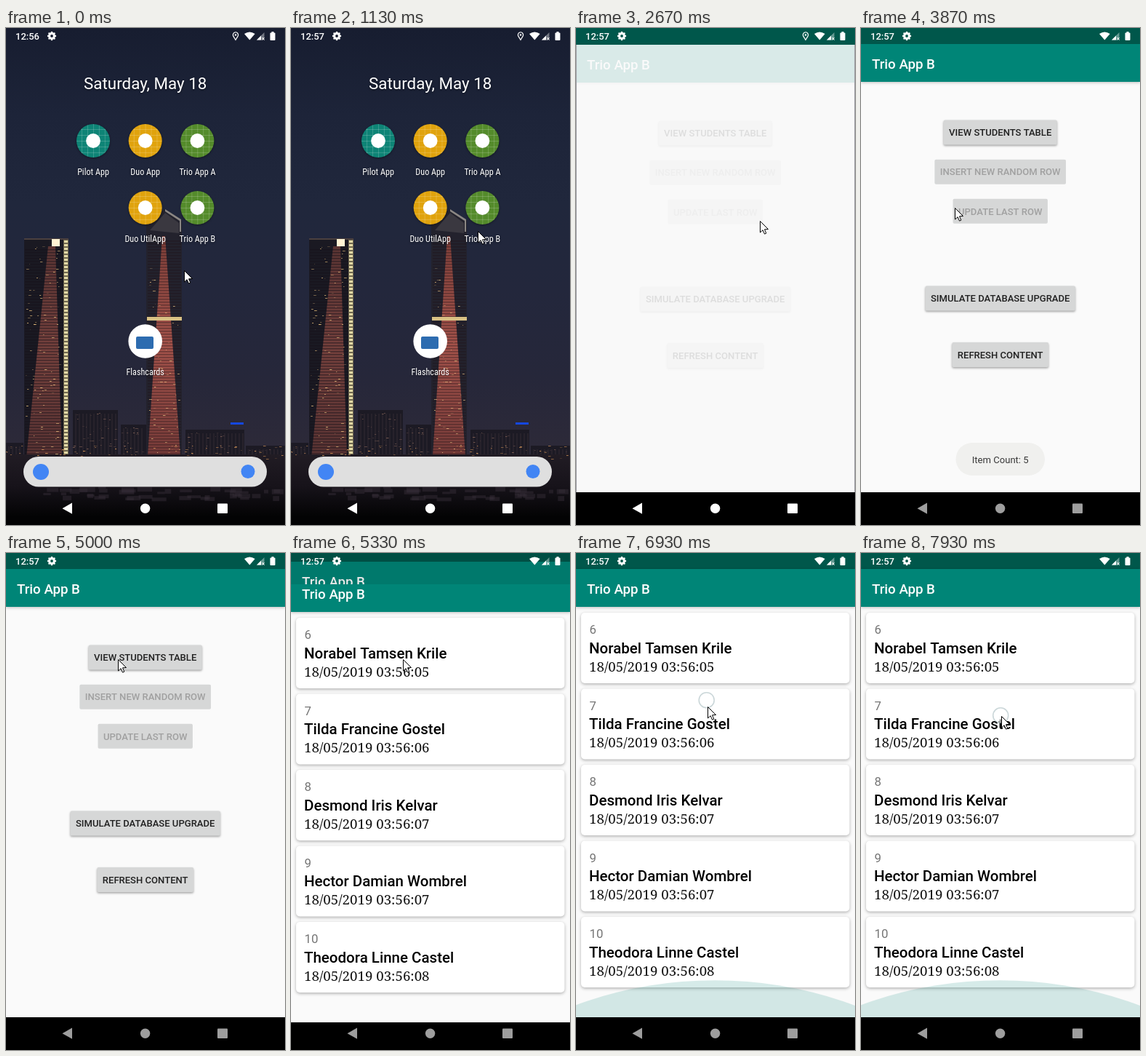
Animation of 384 by 683 pixels, one loop 8000 ms. Source, as an HTML page with a canvas:

```html
<!DOCTYPE html>
<html lang="en">
<head>
<meta charset="utf-8">
<title>Phone demo</title>
<style>
html, body { margin: 0; width: 100%; height: 100%; overflow: hidden; background: #000; }
canvas { display: block; width: 384px; height: 683px; }
</style>
</head>
<body>
<canvas id="stage" width="384" height="683"></canvas>
<script>
const W = 384, H = 683, NAV_TOP = 638, CENTER = 191.7;
const LOOP = 8000, STEP = 200 / 3;
const TEAL = '#008577', DARK_TEAL = '#00574b', PAPER = '#fafafa';
const GREEN = '#548b2b', AMBER = '#e0a30d';
const SANS = 'Roboto, sans-serif';
const stage = document.getElementById('stage').getContext('2d');
let c = stage;

const clamp = x => Math.max(0, Math.min(1, x));
const mix = (a, b, k) => a + (b - a) * k;
const ramp = (t, from, to) => clamp((t - from) / (to - from));

function rect(x, y, w, h, color) {
  c.fillStyle = color;
  c.fillRect(x, y, w, h);
}
function round(x, y, w, h, r, color) {
  c.fillStyle = color;
  c.beginPath();
  c.roundRect(x, y, w, h, r);
  c.fill();
}
function disc(x, y, r, color) {
  c.fillStyle = color;
  c.beginPath();
  c.arc(x, y, r, 0, 7);
  c.fill();
}
function shape(color, ...points) {
  c.fillStyle = color;
  c.beginPath();
  points.forEach(([x, y]) => c.lineTo(x, y));
  c.closePath();
  c.fill();
}
function text(str, x, y, font, color, align = 'left') {
  c.font = font;
  c.fillStyle = color;
  c.textAlign = align;
  c.fillText(str, x, y);
}
function shadow(blur, dy, alpha) {
  c.shadowBlur = blur;
  c.shadowOffsetY = dy;
  c.shadowColor = `rgba(0,0,0,${alpha})`;
}
function group(draw) {
  c.save();
  draw();
  c.restore();
}
function fadeDown(y0, y1, ...colors) {
  const g = c.createLinearGradient(0, y0, 0, y1);
  colors.forEach((color, i) => g.addColorStop(i / (colors.length - 1), color));
  return g;
}

// The pointer rests or glides between these stops, then swings while dragging.
const STOPS = [[130, 245, 333], [600, 290, 292], [933, 266, 291], [1133, 257, 279],
  [1400, 249, 256], [1600, 260, 263], [2300, 260, 263], [3467, 238, 268], [3867, 129, 247],
  [4000, 98, 232], [4333, 160, 138], [4500, 145, 130], [4667, 154, 146]];
const swing = t => Math.cos((t - 6845) / 1060 * 2 * Math.PI);
const dragging = t => ramp(t, 5530, 6000);

function pointer(t) {
  const next = STOPS.findIndex(stop => stop[0] > t);
  const b = STOPS.at(next), a = STOPS[next - 1] || b;
  const k = ramp(t, a[0], b[0]), d = dragging(t), age = t - 6930;
  return [
    mix(mix(a[1], b[1], k), 180.5 + age * .0125, d),
    mix(mix(a[2], b[2], k), 263 + age * .02 - 60 * swing(t), d)
  ];
}

function paintWallpaper() {
  let seed = 7;
  const rnd = () => (seed = seed * 16807 % 2147483647) / 2147483647;
  const lights = (n, x, y, w, h, color) => {
    for (let i = 0; i < n; i++) {
      c.globalAlpha = .15 + rnd() * .65;
      rect(x + Math.floor(rnd() * w), y + Math.floor(rnd() * h), 1 + rnd() * 3, 1, color);
    }
    c.globalAlpha = 1;
  };
  const floors = (x, y, w, color) => {
    for (; y < 590; y += 4) rect(x, y, w, 1.5, color);
  };
  const block = (x, y, w) => {
    rect(x, y, w, 600 - y, '#1c1a24');
    for (let i = x + 3; i < x + w - 2; i += 5) rect(i, y + 5, 2, 60, '#27222b');
    lights(w / 2, x, y + 4, w - 3, 50, '#8d6a5c');
  };
  rect(0, 0, W, 600, fadeDown(0, 600, '#171d30', '#1d2439', '#20273c', '#23273c', '#26273a', '#2e2a38'));

  // Left tower
  rect(25, 289, 55, 304, '#1a1922');
  shape(fadeDown(300, 590, '#5a3433', '#74403c', '#573232'), [58, 300], [68, 300], [77, 590], [28, 590]);
  floors(26, 304, 53, 'rgba(20,16,24,.5)');
  lights(90, 27, 300, 48, 288, '#f0c680');
  rect(25, 289, 61, 2, '#4b403f');
  rect(79, 291, 7, 312, '#6f674f');
  for (let y = 292; y < 602; y += 5) rect(80, y, 5, 3, '#e2d9a6');
  rect(63, 290, 11, 10, '#fff3d4');

  // Right tower
  shape('#23222d', [193, 264], [219, 249], [242, 264], [242, 590], [193, 590]);
  shape('#3a3840', [198, 278], [219, 254], [238, 268], [238, 282]);
  shape('#8b8784', [219, 249], [241, 263], [241, 280], [239, 280], [239, 265], [219, 252]);
  shape(fadeDown(285, 590, '#7d3f39', '#a3524a', '#743a38'), [215, 286], [219, 286], [240, 588], [195, 588]);
  floors(195, 292, 46, 'rgba(30,18,24,.4)');
  lights(60, 196, 330, 43, 255, '#f2c884');
  rect(194, 397, 48, 5, '#d9c184');

  // Skyline
  block(0, 570, 24);
  block(92, 525, 62);
  block(158, 545, 35);
  block(247, 552, 81);
  block(330, 574, 54);
  rect(309, 542, 18, 3, '#1547e0');
  rect(0, 586, W, 97, fadeDown(586, 672, '#211c24', '#17131a', '#030304'));
  lights(90, 0, 574, W, 22, '#e8a35e');
  for (let i = 0; i < 45; i++) {
    c.globalAlpha = .5;
    rect(25 + rnd() * 350, 628 + rnd() * 18, 6 + rnd() * 16, 3 + rnd() * 4, '#352d36');
  }
}

const wallpaper = document.createElement('canvas');
wallpaper.width = W;
wallpaper.height = H;
c = wallpaper.getContext('2d');
paintWallpaper();
c = stage;

c.font = `condensed 12.15px "Roboto Condensed", ${SANS}`;
const LABEL_FONT = c.measureText('Flashcards').width < 56 ? c.font : '10.8px ' + SANS;

function appIcon(x, y, r, color) {
  group(() => {
    shadow(3, 1, .4);
    disc(x, y, r, color);
  });
  group(() => {
    c.beginPath();
    c.arc(x, y, r, 0, 7);
    c.clip();
    for (let i = -3; i < 4; i++) {
      const offset = i * r / 2.9;
      rect(x + offset, y - r, .8, 2 * r, 'rgba(255,255,255,.22)');
      rect(x - r, y + offset, 2 * r, .8, 'rgba(255,255,255,.22)');
    }
  });
  disc(x, y, r * .43, '#fff');
}

const APPS = [
  { name: 'Pilot App', col: 0, row: 0, color: '#0e8476' },
  { name: 'Duo App', col: 1, row: 0, color: AMBER },
  { name: 'Trio App A', col: 2, row: 0, color: GREEN },
  { name: 'Duo UtilApp', col: 1, row: 1, color: AMBER },
  { name: 'Trio App B', col: 2, row: 1, color: GREEN }
];

function drawHome(t) {
  c.drawImage(wallpaper, 0, 0);
  const launching = t > 2260, q = ramp(t, 2250, 2600);
  const shown = launching ? APPS.slice(0, -1) : APPS;
  const label = (name, x, y) => text(name, x, y, LABEL_FONT, '#fff', 'center');
  group(() => {
    if (launching) {
      c.translate(0, 1 + 12 * Math.max(0, q - .05));
      c.globalAlpha = .95 - .7 * q;
    }
    shown.forEach(({ name, col, row, color }) => {
      const x = 120 + col * 71.7, y = 155 + row * 92;
      if (name === 'Trio App B' && t > 1930) disc(x, y, 25, 'rgba(255,255,255,.25)');
      appIcon(x, y, 23, color);
      group(() => {
        shadow(3, 1, .5);
        label(name, x, y + 47);
      });
    });
    disc(CENTER, 430.5, 23.3, '#fff');
    round(179, 424, 24, 17, 2, '#2d6cb0');
    group(() => {
      shadow(3, 1, .5);
      label('Flashcards', CENTER, 477);
      text('Saturday, May 18', CENTER, 84, '22.4px ' + SANS, '#fff', 'center');
    });
    round(24, 589, 335, 41.5, 20.7, '#dfdfdf');
    disc(48, 610, 11, '#4285f4');
    disc(333, 609.5, 9.5, '#4285f4');
  });
  if (launching) drawLaunch(q);
}

function drawLaunch(q) {
  const k = Math.pow(ramp(q, .06, 1), 1.4), r = 28.5;
  const x = mix(262, W / 2, k), y = mix(255, NAV_TOP / 2, k);
  const halfW = mix(r, W / 2, k), halfH = mix(r, NAV_TOP / 2, k);
  group(() => {
    c.beginPath();
    c.roundRect(x - halfW, y - halfH, halfW * 2, halfH * 2, mix(r, 2, k));
    c.clip();
    c.globalAlpha = clamp(k * 3);
    rect(0, 0, W, NAV_TOP, PAPER);
    rect(0, 0, W, 22, DARK_TEAL);
  });
  c.globalAlpha = clamp(1 - k * 1.6);
  appIcon(x, y, mix(r, 80, k), GREEN);
  c.globalAlpha = 1;
}

function drawBar() {
  group(() => {
    shadow(4, 1, .25);
    rect(0, 22, W, 52, TEAL);
  });
  text('Trio App B', 15, 55.5, '500 18.7px ' + SANS, '#fff');
}

function drawButton(label, y, enabled = true) {
  const font = '500 13.07px ' + SANS;
  c.font = font;
  const w = c.measureText(label).width + 15, h = 34;
  group(() => {
    if (enabled) shadow(3, 1.5, .35);
    round(CENTER - w / 2, y, w, h, 2, '#d6d7d7');
  });
  text(label, CENTER, y + h / 2 + 4.7, font, enabled ? '#212121' : '#a0a0a0', 'center');
}

function drawMain(t) {
  rect(0, 0, W, NAV_TOP, PAPER);
  const settling = t < 2730;
  group(() => {
    if (settling) c.translate(0, 1);
    drawBar();
    drawButton('VIEW STUDENTS TABLE', 126.5);
    drawButton('INSERT NEW RANDOM ROW', 180.7, false);
    drawButton('UPDATE LAST ROW', 234.8, false);
    drawButton('SIMULATE DATABASE UPGRADE', 354.5);
    drawButton('REFRESH CONTENT', 432);
  });
  c.globalAlpha = .87 * (1 - ramp(t, 2667, 2934));
  rect(0, 22, W, NAV_TOP - 22, PAPER);
  c.globalAlpha = 1;
  rect(0, 0, W, settling ? 23 : 22, DARK_TEAL);
  if (settling) [0, W - 1].forEach(x => rect(x, 23, 1, 615, '#a5a5ac'));

  c.globalAlpha = Math.min(ramp(t, 3400, 3640), 1 - ramp(t, 4330, 4680));
  round(130.5, 570, 122.5, 45, 22.5, '#f0f0ee');
  text('Item Count: 5', CENTER, 597.7, '13.07px ' + SANS, '#383838', 'center');
  c.globalAlpha = 1;
}

const STUDENTS = ['Norabel Tamsen Krile', 'Tilda Francine Gostel', 'Desmond Iris Kelvar',
  'Hector Damian Wombrel', 'Theodora Linne Castel'];

function drawList(t) {
  rect(0, 0, W, NAV_TOP, PAPER);
  rect(0, 0, W, 22, DARK_TEAL);
  STUDENTS.forEach((name, i) => {
    const y = 82 + i * 104.5;
    group(() => {
      shadow(4, 1.5, .3);
      round(7, y, 369.5, 97, 5, '#fff');
    });
    text(6 + i, 18.5, y + 29, '16.8px ' + SANS, '#757575');
    text(name, 18, y + 55.8, '500 20.5px ' + SANS, '#000');
    const second = 5 + Math.round(i * .75);
    text('18/05/2019 03:56:0' + second, 18, y + 80.6, '18.7px "Noto Serif", serif', '#111');
  });
  const pull = 1.2 * swing(t) * dragging(t);
  drawGlow(clamp(pull), NAV_TOP, 1);
  drawGlow(clamp(-pull), 74, -1);
  drawBar();
}

// Overscroll arc bulging from an edge of the list.
function drawGlow(strength, edge, side) {
  if (!strength) return;
  const r = 461, k = strength * .82;
  group(() => {
    c.beginPath();
    c.rect(0, 74, W, NAV_TOP - 74);
    c.clip();
    c.fillStyle = 'rgba(0,133,119,.16)';
    c.beginPath();
    c.ellipse(191, edge + side * (r - 62) * k, r, r * k, 0, 0, 7);
    c.fill();
  });
}

function drawApp(t) {
  rect(0, 0, W, H, '#000');
  const left = (1 - ramp(t, 5125, 5550)) ** 2, opened = 1 - left;
  if (left > 0) group(() => {
    c.translate(0, -Math.round(13.7 * opened));
    drawMain(t);
    rect(0, 0, W, H, `rgba(0,0,0,${.12 * opened})`);
  });
  if (opened > 0) group(() => {
    const shift = Math.round(28 * left), top = Math.round(640 * left ** 2);
    c.beginPath();
    c.rect(0, top, W, NAV_TOP + shift - top);
    c.clip();
    c.translate(0, shift);
    drawList(t);
  });
}

function drawStatus(t) {
  const white = '#fff';
  text(t < 530 ? '12:56' : '12:57', 13, 16, '500 13px ' + SANS, white);
  c.strokeStyle = white;
  c.lineWidth = 3;
  c.beginPath();
  c.arc(63, 11, 3.4, 0, 7);
  c.stroke();
  for (let a = 0; a < 6; a += Math.PI / 4) {
    disc(63 + 4.9 * Math.cos(a), 11 + 4.9 * Math.sin(a), 1.3, white);
  }
  if (t < 3000) {
    c.lineWidth = 1.2;
    c.beginPath();
    c.arc(316, 9.5, 3.6, Math.PI * .85, Math.PI * .15);
    c.lineTo(316, 16.3);
    c.closePath();
    c.stroke();
    disc(316, 9.5, 1.3, white);
  }
  c.fillStyle = white;
  c.beginPath();
  c.moveTo(335.3, 16.5);
  c.lineTo(328, 8);
  c.quadraticCurveTo(335.3, 3, 342.7, 8);
  c.fill();
  shape('rgba(255,255,255,.4)', [345, 16.5], [355.5, 16.5], [355.5, 6]);
  shape(white, [345, 16.5], [351, 16.5], [351, 10.5]);
  c.lineWidth = 1;
  c.beginPath();
  c.moveTo(352.5, 13); c.lineTo(355.5, 16.5);
  c.moveTo(355.5, 13); c.lineTo(352.5, 16.5);
  c.stroke();
  round(363.5, 6.5, 7, 10.5, 1, white);
  rect(365.5, 5, 3, 2, white);
}

function drawNav(t) {
  const v = Math.round(mix(255, 158, ramp(t, 2700, 3450)));
  const color = `rgb(${v},${v},${v})`;
  shape(color, [91, 652.5], [91, 667.8], [77.5, 660.2]);
  disc(191.6, 660.2, 6.7, color);
  round(291, 653.5, 14, 13.5, 1, color);
}

function drawTouch(t) {
  if (t < 5830) return;
  const [x, y] = pointer(t - STEP);
  disc(x, y, 10.5, 'rgba(255,255,255,.6)');
  c.strokeStyle = 'rgba(125,155,160,.4)';
  c.lineWidth = 1.6;
  c.stroke();
}

function drawPointer(t) {
  const [x, y] = pointer(t);
  group(() => {
    c.translate(Math.round(x) + .5, Math.round(y) + .5);
    shape('#fff', [0, 0], [0, 15.5], [3.6, 12.2], [6, 17.6], [8.3, 16.6], [6, 11.3], [11, 11]);
    c.strokeStyle = '#000';
    c.lineWidth = 1;
    c.stroke();
  });
}

const begin = performance.now();
function draw() {
  const now = (performance.now() - begin) % LOOP;
  const t = Math.floor((now + 4) / STEP) * STEP;
  (t < 2600 ? drawHome : drawApp)(t);
  drawStatus(t);
  drawNav(t);
  drawTouch(t);
  drawPointer(t);
  requestAnimationFrame(draw);
}
draw();
</script>
</body>
</html>
```
